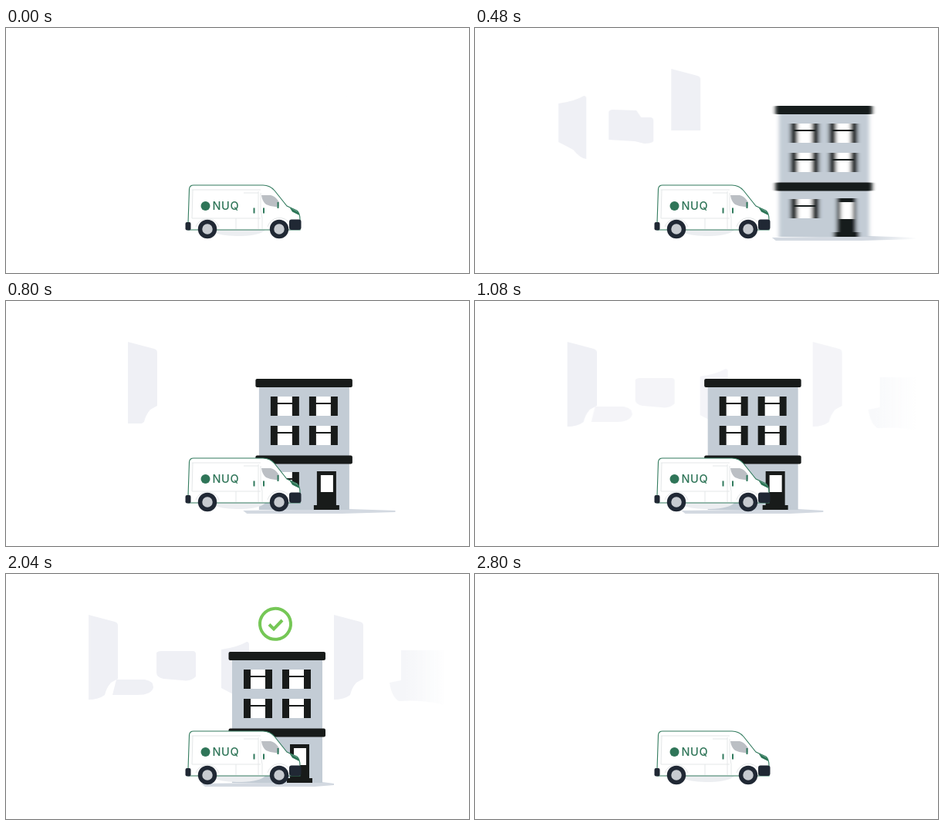
Animation of 600 by 318 pixels, one loop 2840 ms. Source, as an HTML page:

```html
<!DOCTYPE html>
<html lang="en">
<head>
<meta charset="utf-8">
<title>Van delivery</title>
<style>
  html, body { margin: 0; width: 100%; height: 100%; overflow: hidden; background: #fff; }
  svg { display: block; width: 600px; height: 318px; }
  text { font: 500 14.5px Inter, Lato, sans-serif; letter-spacing: .6px; }
</style>
</head>
<body>
<svg viewBox="0 0 600 318">
  <defs>
    <linearGradient id="edges" gradientUnits="userSpaceOnUse" x1="60" y1="0" x2="573" y2="0">
      <stop offset="0" stop-color="#000"/>
      <stop offset=".1" stop-color="#fff"/>
      <stop offset=".89" stop-color="#fff"/>
      <stop offset="1" stop-color="#000"/>
    </linearGradient>
    <mask id="fade" maskUnits="userSpaceOnUse" x="0" y="0" width="600" height="318">
      <rect width="600" height="318" fill="url(#edges)"/>
    </mask>
    <clipPath id="towerClip"><rect id="towerBox" x="0" y="0" width="1200" height="163"/></clipPath>
    <filter id="motion" filterUnits="userSpaceOnUse" x="200" y="80" width="300" height="210">
      <feGaussianBlur id="blur" stdDeviation="0 0"/>
    </filter>
    <path id="tower" d="M107 53L141 62Q145 63 145 67V136L136 141Q130 148 128 157Q120 163 107 163Z"/>
    <path id="ledge" d="M143 137H180Q191 139 191 147Q189 157 170 157H138Z"/>
    <path id="gable" d="M279 98Q300 95 312 88Q315 88 315 92V170Q308 170 298 158L279 148Z"/>
    <path id="block" d="M195 102Q197 100 201 100H242Q246 100 246 104V133Q240 140 228 138L204 136Q195 134 195 128Z"/>
    <g id="window">
      <path d="M0 0H37V25H0Z" fill="#181b1a"/>
      <path d="M9 0H28V8H9ZM9 10H28V25H9Z" fill="#fff"/>
    </g>
  </defs>

  <g id="scene" mask="url(#fade)">
    <g id="skyline" fill="#eff0f5">
      <g clip-path="url(#towerClip)"><use href="#tower"/></g>
      <g id="early">
        <use href="#gable" x="-318"/>
        <path d="M26 109Q27 106 31 106L62 107L68 116H81Q84 117 84 120V147Q82 150 72 150L60 147L26 145Z"/>
      </g>
      <g id="late">
        <use href="#ledge"/>
        <use href="#gable"/>
        <use href="#block"/>
        <g clip-path="url(#towerClip)"><use href="#tower" x="318"/></g>
        <path d="M512 99H568V170Q540 163 509 165Q500 160 497 141L512 138Z" opacity=".6"/>
      </g>
    </g>
    <g id="building">
      <path id="shadow" fill="#d3d9e1"/>
      <g filter="url(#motion)">
        <path d="M293 108H410V271H293Z" fill="#c3ccd5"/>
        <g fill="#181b1a">
          <rect x="288.5" y="101" width="125.5" height="11" rx="2"/>
          <rect x="288.5" y="200.5" width="125.5" height="11" rx="2"/>
          <path d="M368 221H393V265H397V271H364V265H368Z"/>
        </g>
        <rect x="373" y="226" width="16" height="22" fill="#fff"/>
        <use href="#window" x="308" y="124"/>
        <use href="#window" x="358" y="124"/>
        <use href="#window" x="308" y="162"/>
        <use href="#window" x="358" y="162"/>
        <use href="#window" x="308" y="222"/>
      </g>
    </g>
  </g>

  <g id="badge" fill="none" stroke-width="4">
    <circle id="ring" cx="349" cy="64.800" r="20" stroke-linecap="round" pathLength="360" transform="rotate(-96 349 64.800)"/>
    <path id="tick" pathLength="100" d="M341 65.500L347 71.500L358 60"/>
  </g>

  <g id="van">
    <path d="M272 262H336Q330 269 305 270Q280 270 272 266Z" fill="#eceef1"/>
    <path d="M236 253L237.500 209Q238 204 243 204H333Q342 204 348 211L364 231L377 237Q381 240 381 249V262H236Z" fill="#fff" stroke="#327b5e" stroke-width="1.1"/>
    <path d="M241 210H330M242 210L241 247H330M298 247V261M327 212V261M330 214V235L332 247V261M308 214H327M246 258A16 16 0 0 1 276 258M339 258A16 16 0 0 1 368 254" fill="none" stroke="#e4e7e8"/>
    <path d="M331 217H343Q349 218 354 226V232Q345 233 337 229Q332 225 331 217Z" fill="#bbbfc4"/>
    <path d="M352.500 226V234M321.500 233.500V240.500M334 233.500V240.500" stroke="#327b5e" stroke-width="2"/>
    <path d="M367.500 233L378 238.500Q380 240 380 243L371 238.500Z" fill="#2c7556"/>
    <g fill="#202834">
      <rect x="232.500" y="252" width="7" height="10.500" rx="2"/>
      <rect x="367" y="248.500" width="15.500" height="13.500" rx="3"/>
    </g>
    <g fill="#c7cbd0" stroke="#202834" stroke-width="5.500">
      <circle cx="261" cy="261" r="9.500"/>
      <circle cx="354" cy="261" r="9.500"/>
    </g>
    <circle cx="258.500" cy="231" r="6" fill="#2f7558"/>
    <text x="267.500" y="236" fill="#2f7558">NUQ</text>
  </g>
</svg>
<script>
const LOOP = 2840, SLIDE = 1555, DISTANCE = 306, PARALLAX = 1.46;
const el = id => document.getElementById(id);
const set = (id, name, value) => el(id).setAttribute(name, value);
const ramp = (t, from, to) => Math.min(1, Math.max(0, (t - from) / (to - from)));
const smooth = p => p * p * (3 - 2 * p);
const mix = (a, b, p) => a + (b - a) * p;

function draw(t) {
  const left = 1 - ramp(t, 0, SLIDE);
  const offset = DISTANCE * left ** 3;
  const speed = 3 * DISTANCE / SLIDE * left ** 2;
  set('building', 'transform', `translate(${offset} 0)`);
  set('skyline', 'transform', `translate(${offset * PARALLAX} 0)`);
  set('blur', 'stdDeviation', `${35 * speed ** 2} 0`);

  set('scene', 'opacity', 1 - ramp(t, 2240, 2500));
  set('skyline', 'opacity', ramp(t, 0, 200));
  set('early', 'opacity', 1 - ramp(t, 480, 760));
  set('late', 'opacity', ramp(t, 800, 1200));
  set('towerBox', 'height', mix(mix(133, 163, ramp(t, 480, 850)), 100, ramp(t, 2240, 2360)));

  // The shadow trails behind the building while it moves
  const tail = 425 + 45 * ramp(speed, 0, .14);
  const start = mix(284, 253, ramp(t, 560, 1200));
  set('shadow', 'd', `M${start} 272L410 270L${tail} 272V274L400 276H${start + 5}Z`);

  // Ring, then tick
  const sweep = 390 * smooth(ramp(t, 1190, 1680));
  const tone = ramp(t, 1440, 1760);
  const green = `rgb(${mix(106, 117, tone)} ${mix(176, 199, tone)} ${mix(76, 86, tone)})`;
  const tick = 100 * smooth(ramp(t, 1700, 1900));
  set('badge', 'stroke', green);
  set('badge', 'opacity', 1 - ramp(t, 2220, 2340));
  set('ring', 'stroke-dasharray', `${Math.min(sweep, 360)} 400`);
  set('ring', 'visibility', sweep > 0 ? 'visible' : 'hidden');
  set('tick', 'stroke-dasharray', `${tick} 200`);
  set('tick', 'visibility', tick > 0 ? 'visible' : 'hidden');
}

function frame() {
  draw(performance.now() % LOOP);
  requestAnimationFrame(frame);
}
frame();
</script>
</body>
</html>
```
